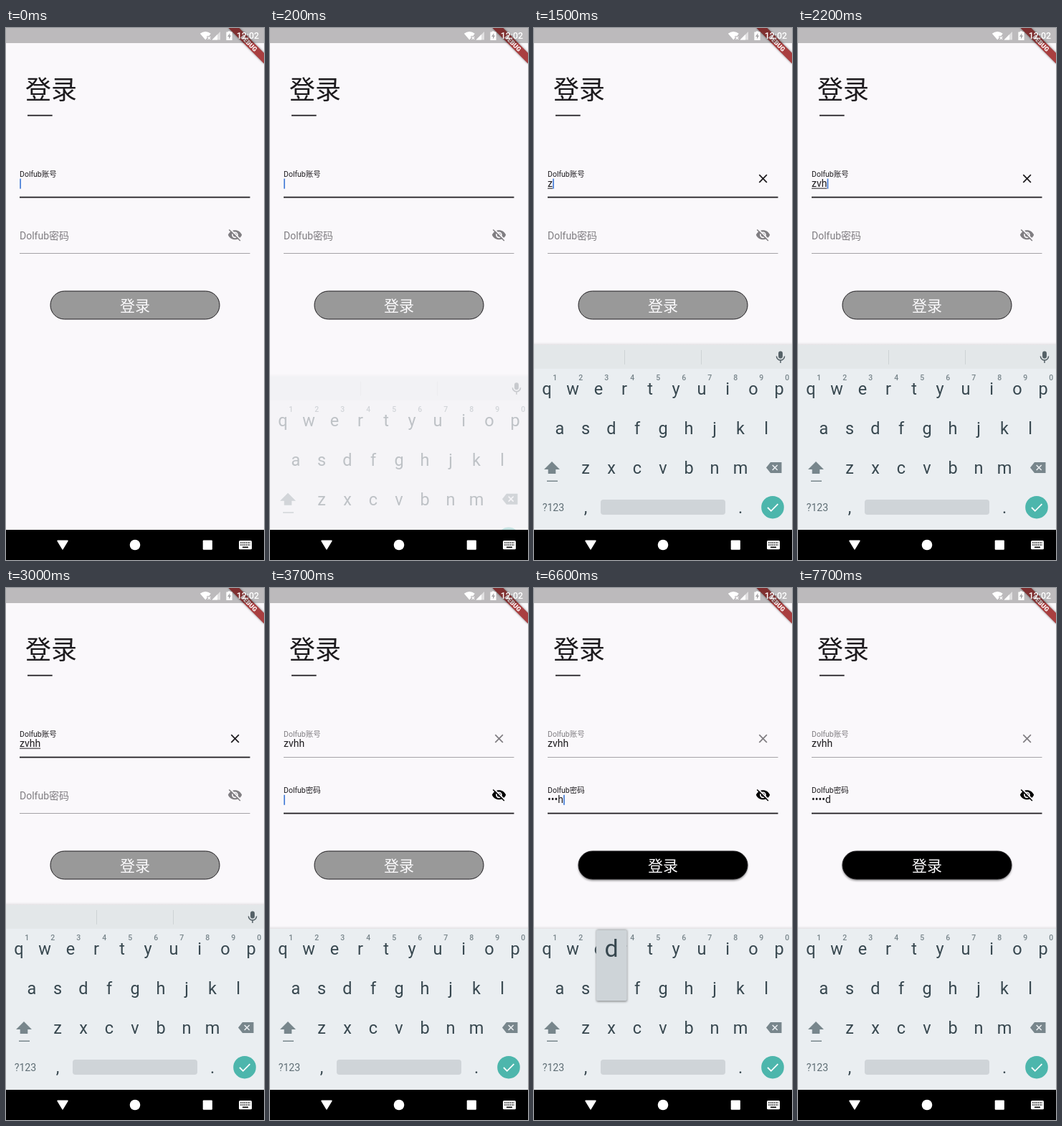
Animation, 360 px wide and 740 px high, one loop 8000 ms. Source, as an HTML page:

```html
<!DOCTYPE html>
<html lang="zh-CN">
<head>
<meta charset="utf-8">
<title>登录</title>
<style>
  html, body { margin: 0; width: 100%; height: 100%; overflow: hidden; background: #faf8fb; }
  svg { display: block; width: 360px; height: 740px; }
  text { font-family: Roboto, 'Noto Sans CJK SC', 'Noto Sans CJK', sans-serif; white-space: pre; }
  .mid { text-anchor: middle; }
  .ink { fill: #1d1b1e; }
  .typed { font-size: 14px; fill: #1d1b1e; }
  .key { font-size: 23.5px; fill: #37474f; text-anchor: middle; }
  .hint { font-size: 10.5px; font-weight: 500; fill: #78858b; text-anchor: middle; }
  .cursor { fill: #4a80d8; }
</style>
</head>
<body>
<svg viewBox="0 0 360 740">
  <defs>
    <filter id="soft" x="-20%" y="-50%" width="140%" height="200%"><feGaussianBlur stdDeviation="1.6"/></filter>
    <linearGradient id="edge" x2="0" y2="1">
      <stop offset="0" stop-color="#000" stop-opacity="0"/>
      <stop offset="1" stop-color="#000" stop-opacity=".09"/>
    </linearGradient>
    <clipPath id="screen"><path d="M0 0H360V698H0Z"/></clipPath>
  </defs>
  <path fill="#faf8fb" d="M0 0H360V740H0Z"/>

  <!-- Form -->
  <text class="ink" x="27" y="99.3" font-size="36">登录</text>
  <path fill="#1d1b1e" d="M30 120.7h34.7v1.7H30Z"/>

  <text id="userLabel" x="19" y="206.7" font-size="10.5">Dolfub账号</text>
  <text id="user" class="typed" x="19" y="221.3"></text>
  <rect id="compose" x="19" y="222.6" height="1" fill="#1d1b1e"/>
  <rect id="userCursor" class="cursor" y="209.6" width="1.75" height="14"/>
  <rect id="userLine" x="19" width="321.5"/>
  <path id="clear" d="M314.3 204.2l10.6 10.6m0-10.6l-10.6 10.6" fill="none" stroke-width="1.7"/>

  <text id="passLabel" x="19">Dolfub密码</text>
  <text id="pass" class="typed" x="19" y="299.3"></text>
  <rect id="passCursor" class="cursor" y="287.8" width="1.75" height="14"/>
  <rect id="passLine" x="19" width="321.5"/>
  <g id="eye" transform="translate(309 277.3) scale(.875)">
    <path d="M1 12C2.7 7.6 7 4.5 12 4.5S21.3 7.6 23 12C21.3 16.4 17 19.5 12 19.5S2.7 16.4 1 12Z"/>
    <circle cx="12" cy="12" r="5" fill="#faf8fb"/>
    <circle cx="12" cy="12" r="3"/>
    <path d="M3.6 2.1L22 20.5" stroke="#faf8fb" stroke-width="2"/>
    <path d="M2.6 3.6L20.4 21.4" stroke="currentColor" stroke-width="1.8"/>
  </g>

  <rect id="buttonShadow" x="62" y="368" width="236" height="39" rx="19.5" filter="url(#soft)"/>
  <rect id="button" x="62" y="366" width="236" height="39" rx="19.5" stroke="#1d1b1e"/>
  <text class="mid" x="180" y="393.8" font-size="21" fill="#fbfafc">登录</text>

  <!-- Keyboard -->
  <g clip-path="url(#screen)">
    <g id="keyboard">
      <path fill="#eaeef1" d="M0 474H360V698H0Z"/>
      <path fill="url(#edge)" d="M0 470H360V474H0Z"/>
      <g id="strip">
        <path fill="url(#edge)" d="M0 437H360V441H0Z"/>
        <path fill="#e3e7e9" d="M0 441H360V474H0Z"/>
        <path stroke="#cdd2d5" d="M126.5 448v20M233.5 448v20"/>
        <g fill="none" stroke="#566268" stroke-width="1.5">
          <rect x="341.8" y="450.3" width="4.4" height="8.6" rx="2.2" fill="#566268"/>
          <path d="M338.4 456.5a5.6 5.6 0 0 0 11.2 0M344 462v4"/>
        </g>
      </g>
      <g id="keys"></g>
      <path fill="#78868c" d="M25 603L36 614H30.3V620H19.7V614H14ZM18 629.6h15v1.5H18Z"/>
      <path fill="#78868c" d="M330 604H345.5V619H330L324 611.5Z"/>
      <path stroke="#eaeef1" stroke-width="1.6" d="M332.7 608l7 7m0-7l-7 7"/>
      <text class="mid" x="27" y="671.5" font-size="14.2" fill="#5f6e75">?123</text>
      <text class="key" x="72" y="675">,</text>
      <text class="key" x="288" y="675">.</text>
      <rect x="93" y="656" width="174" height="21" rx="4" fill="#cfd4d8"/>
      <circle cx="333" cy="666.7" r="15.8" fill="#4db6ac"/>
      <path d="M326 667l4.8 4.8 9.6-9.6" fill="none" stroke="#fff" stroke-width="1.8"/>
      <g id="popup">
        <rect x="-21" y="1.5" width="43" height="100" rx="2" fill="#000" opacity=".4" filter="url(#soft)"/>
        <rect id="popupFace" x="-21.3" width="43" rx="2" fill="#ced4d8"/>
        <text id="popupKey" class="key" style="font-size:34px"></text>
      </g>
    </g>
  </g>

  <!-- Debug ribbon -->
  <g transform="translate(360 0) rotate(45)">
    <path d="M-35 24.5h70v10.5h-70Z" opacity=".5" filter="url(#soft)"/>
    <path fill="#a93f40" d="M-35 24.5h70v10.5h-70Z"/>
    <text class="mid" y="32.9" font-size="8.9" font-weight="900" fill="#fff">DEBUG</text>
  </g>

  <!-- System bars -->
  <path fill-opacity=".25" d="M0 0H360V21H0Z"/>
  <g fill="#fff">
    <path d="M270.8 7.8Q278.3 2.4 285.8 7.8L283.4 11H280.4V14L278.3 16.6Z"/>
    <path d="M281.6 12l3.6 3.8m0-3.8l-3.6 3.8" stroke="#fff" stroke-width="1.1"/>
    <path d="M299 5V16.5H287.5Z" opacity=".55"/>
    <path d="M295 9V16.5H287.5Z"/>
    <path d="M307.4 5.6h2.4V4.4h3.4v1.2h2.4V17h-8.2Z"/>
    <path fill="#aaa8ab" d="M312.4 7l-3.4 5h2v3.4l3.2-5h-1.8Z"/>
    <text x="321.7" y="15.3" font-size="12.4" font-weight="500">12:02</text>
  </g>
  <path d="M0 698H360V740H0Z"/>
  <g fill="#fff">
    <path d="M72 713.3H86L79 725Z" stroke="#fff" stroke-width="1.4" stroke-linejoin="round"/>
    <circle cx="180" cy="719" r="7.3"/>
    <rect x="274.7" y="712.5" width="13.2" height="13.2" rx="1"/>
    <rect x="325" y="713" width="18" height="12.3" rx="1.5"/>
    <path stroke="#000" stroke-width="1.5" stroke-dasharray="1.5 1.2" d="M327.2 716h14M327.2 719h14"/>
    <path fill="#000" d="M330 721.5h8v1.6h-8Z"/>
  </g>
</svg>
<script>
const LOOP = 8000;
const GREY = '#807e82', INK = '#1d1b1e';
const $ = id => document.getElementById(id);
const set = (id, attrs) => {
  for (const name in attrs) $(id).setAttribute(name, attrs[name]);
};
const show = (id, on) => set(id, { visibility: on ? 'visible' : 'hidden' });
const mix = (a, b, p) => a + (b - a) * p;
const progress = (t, from, to) => Math.min(1, Math.max(0, (t - from) / (to - from)));
const ease = p => p * p * (3 - 2 * p);

// Key layout: letters, first centre x, baseline
const rows = [['qwertyuiop', 18, 510], ['asdfghjkl', 36, 565], ['zxcvbnm', 72, 620]];
const keyAt = {};
let markup = '';
for (const [letters, left, y] of rows) {
  [...letters].forEach((letter, i) => {
    const x = left + 36 * i;
    keyAt[letter] = { x, y };
    markup += `<text class="key" x="${x}" y="${y}">${letter}</text>`;
    if (y === 510) markup += `<text class="hint" x="${x + 11.3}" y="490.4">${(i + 1) % 10}</text>`;
  });
}
$('keys').innerHTML = markup;

// Key presses: letter, pressed, typed, released
const userKeys = [['z', 1200, 1300, 1500], ['v', 1700, 1800, 1900], ['h', 2100, 2200, 2200], ['h', 2400, 2500, 2600]];
const passKeys = [['d', 4000, 5900, 5950], ['h', 5950, 6000, 6100], ['d', 6100, 6200, 6250],
  ['h', 6300, 6400, 6450], ['d', 6600, 6900, 7100]];
const presses = [...userKeys, ...passKeys];
const cursorTimes = {
  user: [[0, 900], [1300, 3000]],
  pass: [[3600, 3800], [5900, 7500]]
};
const typedBy = (keys, t) => keys.filter(k => t >= k[2]).map(k => k[0]).join('');

function drawField(id, value, t, focused, lineY) {
  const text = $(id);
  if (text.textContent !== value) text.textContent = value;
  const width = value ? text.getComputedTextLength() : 0;
  set(id + 'Cursor', { x: 19.2 + width });
  show(id + 'Cursor', cursorTimes[id].some(([on, off]) => t >= on && t < off));
  set(id + 'Line', {
    y: focused ? lineY - .4 : lineY, height: focused ? 1.75 : 1, fill: focused ? INK : '#a5a3a7'
  });
  set(id + 'Label', { fill: focused ? INK : GREY });
  return width;
}

function drawPopup(t) {
  const press = presses.find(([, down, , up]) => t >= down && t < up);
  show('popup', press);
  if (!press) return;
  const { x, y } = keyAt[press[0]];
  const drop = t < press[1] + 100 ? 2 : 0;
  set('popup', { transform: `translate(${x} ${y - 91})` });
  set('popupFace', { y: drop, height: 100 - drop });
  set('popupKey', { y: 37 + drop });
  $('popupKey').textContent = press[0];
}

function render(t) {
  const onPass = t >= 3600;
  const user = typedBy(userKeys, t);
  const userWidth = drawField('user', user, t, !onPass, 235);
  set('compose', { width: onPass ? 0 : userWidth });
  show('clear', user);
  set('clear', { stroke: onPass ? GREY : INK });

  const secret = typedBy(passKeys, t);
  drawField('pass', secret && '•'.repeat(secret.length - 1) + secret.slice(-1), t, onPass, 313);
  const float = ease(progress(t, 3520, 3700));
  set('passLabel', { y: mix(293.8, 284.7, float), 'font-size': mix(14, 10.5, float) });
  const eyeColor = onPass ? '#000' : GREY;
  set('eye', { fill: eyeColor, color: eyeColor });

  const enabled = progress(t, 5900, 6100);
  const shade = Math.round(mix(153, 0, enabled));
  set('button', { fill: `rgb(${shade},${shade},${shade})` });
  set('buttonShadow', { opacity: .45 * enabled });

  const rise = 1 - (1 - progress(t, 150, 500)) ** 3;
  set('keyboard', {
    transform: `translate(0 ${mix(70, 0, rise)})`, opacity: progress(t, 150, 320)
  });
  show('strip', t < 3400);
  drawPopup(t);
}

const start = performance.now();
function tick() {
  render((performance.now() - start) % LOOP);
  requestAnimationFrame(tick);
}
tick();
</script>
</body>
</html>
```
